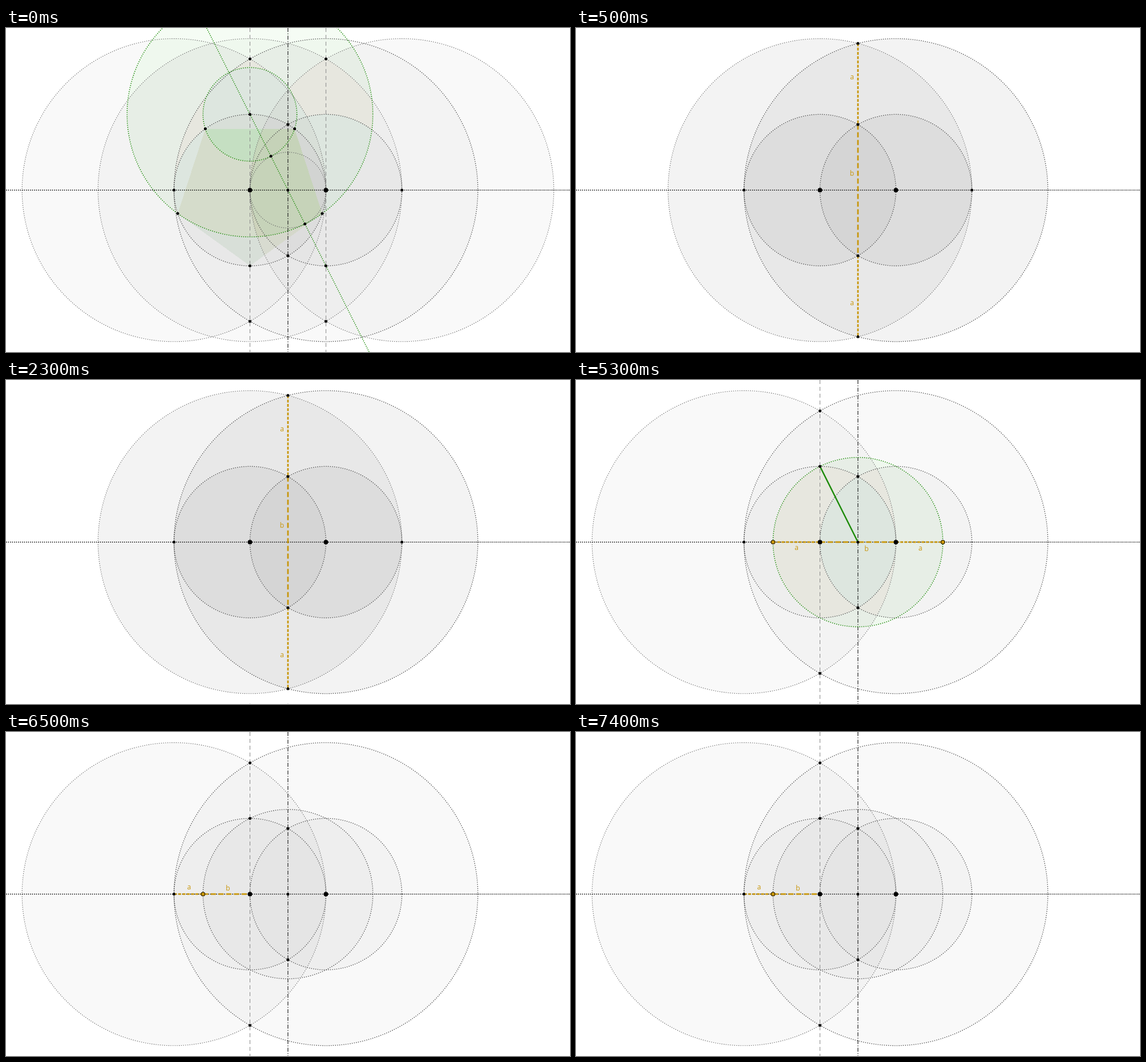
Recreate the animation shown at these times as an HTML page with a canvas. Size 986 by 568 pixels, loop 8000 ms.

```html
<!DOCTYPE html>
<html lang="en">
<head>
<meta charset="utf-8">
<title>Golden ratio constructions</title>
<style>
  html, body { margin: 0; width: 100%; height: 100%; overflow: hidden; background: #fff; }
  canvas { display: block; }
</style>
</head>
<body>
<canvas id="stage" width="986" height="568"></canvas>
<script>
const W = 986, H = 568, TAU = Math.PI * 2;
const R = 132.8, CY = 284.2, AX = 426.5, BX = AX + R, MX = AX + R / 2;
const LX = AX - R, RX = BX + R;
const MINOR = R * (Math.sqrt(5) - 1) / 2;   // golden section of R
const MAJOR = R + MINOR;
const TOP = CY - R;
const V = R * Math.sqrt(3), V2 = V / 2, V4 = R * Math.sqrt(15) / 2;
const GOLD = '#c8960a', GREEN = '#1c8a08', BLACK = '#000', DARK = '#484848', SOFT = '#666';

const circle = (x, r, color = DARK, y = CY) => ({ x, y, r, color });
const smallA = circle(AX, R), smallB = circle(BX, R);
const bigL = circle(LX, 2 * R, SOFT), bigA = circle(AX, 2 * R, SOFT);
const bigB = circle(BX, 2 * R), bigR = circle(RX, 2 * R, SOFT);
const tiny = circle(MX, R / 2, SOFT);
const midRadius = R * Math.sqrt(5) / 2;

// Fill tones by the number of overlapping circles
const tones = text => text.split(' ').map(h => [0, 2, 4].map(i => parseInt(h.slice(i, i + 2), 16)));
const GRAY = tones('ffffff f9f9f9 f3f3f3 eeeeee e8e8e8 e5e5e5 dddddd d5d5d5');
const STRONG = tones('ffffff f3f3f3 e8e8e8 dddddd d5d5d5');
const TINT = tones('f5fcf4 eff8ee e7eee6 e7e7df dde6df d8dfd8 d5d8d5 d2d4d2');
const PENTA = tones('d8dfd8 d8dfd8 d8dfd8 d8dfd8 d8dfd8 d8dbd0 d5d8cb d0d5c5');
const PENTA_TINT = tones('d5dccb d5dccb d5dccb d5dccb d5dccb cdd3bc c6d3b9 c6d3b9');
const BRIGHT = tones('c5dfc2 c5dfc2 c5dfc2 c5dfc2 c5dfc2 c6d6ba c5d2b8 c5d2b8');

const inside = (c, x, y) => (x - c.x) ** 2 + (y - c.y) ** 2 < c.r ** 2;
const fifths = [0, 1, 2, 3, 4].map(k => TAU / 4 + k * TAU / 5);
const normals = fifths.map(a => [Math.cos(a + TAU / 10), Math.sin(a + TAU / 10)]);
const apothem = R * Math.cos(TAU / 10);
const inPentagon = (x, y) => normals.every(([nx, ny]) => (x - AX) * nx + (y - CY) * ny <= apothem);

let g;

function fillRegions(circles, green = [], scale = GRAY, pentagon = false) {
  const image = g.createImageData(W, H);
  for (let y = 0, i = 0; y < H; y++) for (let x = 0; x < W; x++, i += 4) {
    const px = x + .5, py = y + .5;
    let n = 0, tint = 0;
    for (const c of circles) n += inside(c, px, py);
    for (const c of green) tint += inside(c, px, py);
    let set = tint ? TINT : scale;
    if (pentagon && inPentagon(px, py)) set = [PENTA, PENTA_TINT, BRIGHT][tint];
    else if (tint > 1) n = Math.max(4, n + 1);
    image.data.set(set[Math.min(n, set.length - 1)], i);
    image.data[i + 3] = 255;
  }
  g.putImageData(image, 0, 0);
}

function stroke(color, width, dash) {
  g.strokeStyle = color;
  g.lineWidth = width;
  g.setLineDash(dash);
  g.stroke();
}

function line(x1, y1, x2, y2, color, width, dash = []) {
  g.beginPath();
  g.moveTo(x1, y1);
  g.lineTo(x2, y2);
  stroke(color, width, dash);
}

function rings(list) {
  for (const c of list) {
    g.beginPath();
    g.arc(c.x, c.y, c.r, 0, TAU);
    stroke(c.color, c.color === SOFT ? 1.1 : c.color === GREEN ? 1.6 : 1.3, [1.4, 2.3]);
  }
}

function dot(x, y, r = 2.5, color = BLACK) {
  g.beginPath();
  g.arc(x, y, r, 0, TAU);
  g.fillStyle = color;
  g.fill();
  if (color === GOLD) stroke(BLACK, 1, []);
}

const dots = list => list.forEach(([x, y]) => dot(x, y));
const centers = () => { dot(AX, CY, 3.9); dot(BX, CY, 3.9); };
const horizon = () => line(0, CY, 985, CY, BLACK, 1.5, [1.5, 2]);
const dashed = x => line(x, 0, x, H, '#888', 1, [7, 5]);
const axis = () => line(MX, 0, MX, H, '#222', 1.2, [7, 2.5, 1.5, 2.5]);
const partA = (...ends) => line(...ends, GOLD, 2.7, [5, 2.5]);
const partB = (...ends) => line(...ends, GOLD, 2.7, [9, 4.5]);

function label(text, x, y) {
  g.font = '12px "Open Sans", "Noto Sans", sans-serif';
  g.textAlign = 'center';
  g.fillStyle = GOLD;
  g.fillText(text, x, y);
}

function pentagonScene() {
  const circles = [bigL, bigA, bigR, bigB, smallA, smallB, tiny];
  const green = [circle(AX, MAJOR, GREEN, TOP), circle(AX, MINOR, GREEN, TOP)];
  fillRegions(circles, green, GRAY, true);
  dashed(AX);
  dashed(BX);
  axis();
  rings([...circles, ...green]);
  horizon();
  line(AX - TOP / 2, 0, AX + (H - TOP) / 2, H, GREEN, 1.5, [1.5, 2]);
  const along = d => [AX + d / Math.sqrt(5), TOP + 2 * d / Math.sqrt(5)];
  dots([
    [AX, CY - V], [BX, CY - V], [AX, CY + V], [BX, CY + V],
    [AX, TOP], [BX, CY + R], [MX, CY - V2], [MX, CY + V2],
    [LX, CY], [MX, CY], [RX, CY], along(MINOR), along(MAJOR),
    ...fifths.map(a => [AX + R * Math.cos(a), CY + R * Math.sin(a)])
  ]);
  centers();
}

function verticalScene() {
  const circles = [bigA, bigB, smallA, smallB];
  fillRegions(circles, [], STRONG);
  rings(circles);
  horizon();
  partA(MX, CY - V4, MX, CY - V2);
  partB(MX, CY - V2, MX, CY + V2);
  partA(MX, CY + V2, MX, CY + V4);
  dots([[LX, CY], [RX, CY], ...[-V4, -V2, V2, V4].map(d => [MX, CY + d])]);
  centers();
  label('a', 482.5, 89.5);
  label('b', 482.5, 258.5);
  label('a', 482.5, 486);
  g.fillStyle = '#bbb';
  for (const x of [AX, MX]) g.fillRect(x - .5, 567, 1, 1);
}

// Shared by the two horizontal constructions
function horizontalBase(circles, green) {
  fillRegions(circles, green);
  dashed(AX);
  axis();
  rings([...circles, ...green]);
  horizon();
}

function horizontalDots() {
  dots([[AX, CY - V], [AX, CY + V], [AX, TOP], [MX, CY - V2], [MX, CY + V2], [LX, CY], [MX, CY]]);
  centers();
}

function radiusScene() {
  horizontalBase([bigL, bigB, smallA, smallB], [circle(MX, midRadius, GREEN)]);
  partA(AX - MINOR, CY, AX, CY);
  partB(AX, CY, BX, CY);
  partA(BX, CY, BX + MINOR, CY);
  line(AX, TOP, MX, CY, GREEN, 2.4);
  horizontalDots();
  dot(AX - MINOR, CY, 3.5, GOLD);
  dot(BX + MINOR, CY, 3.5, GOLD);
  label('a', 385.5, 297.5);
  label('b', 508, 299.5);
  label('a', 602, 299);
}

function sectionScene() {
  horizontalBase([bigL, bigB, smallA, smallB, circle(MX, midRadius)], []);
  partA(LX, CY, AX - MINOR, CY);
  partB(AX - MINOR, CY, AX, CY);
  horizontalDots();
  dot(AX - MINOR, CY, 3.5, GOLD);
  label('a', 320, 276);
  label('b', 388, 277.5);
}

const scenes = [[0, pentagonScene], [500, verticalScene], [3500, radiusScene], [6500, sectionScene]]
  .map(([start, draw]) => {
    const canvas = document.createElement('canvas');
    canvas.width = W;
    canvas.height = H;
    g = canvas.getContext('2d');
    draw();
    return { start, canvas };
  });

const stage = document.getElementById('stage').getContext('2d');
const begin = performance.now();
let shown;

function tick() {
  const time = (performance.now() - begin) % 8000;
  const scene = scenes.findLast(s => time >= s.start);
  if (scene !== shown) stage.drawImage((shown = scene).canvas, 0, 0);
  requestAnimationFrame(tick);
}
tick();
</script>
</body>
</html>
```
